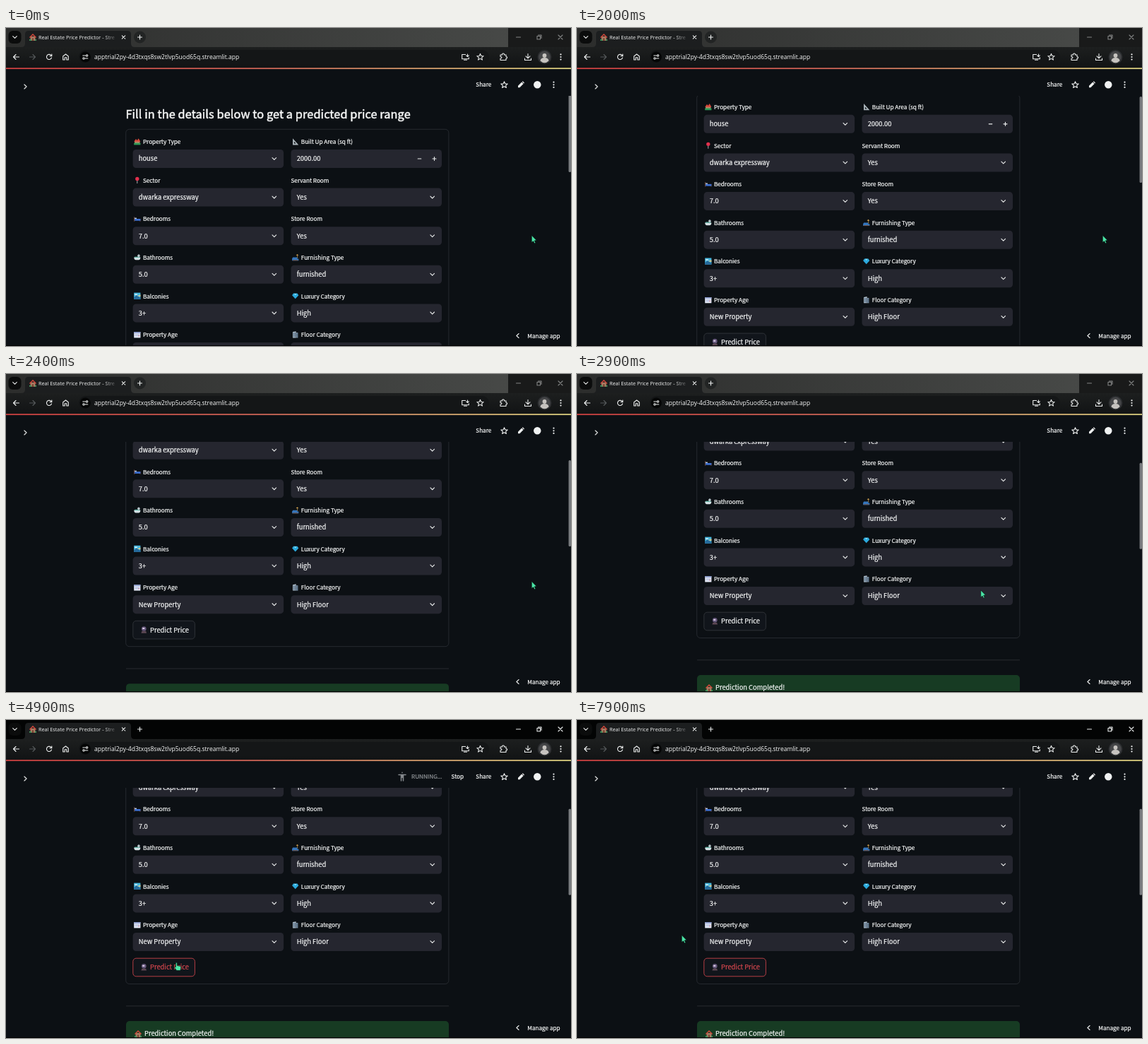
These frames come from a looping animation (800x450 px, 8000 ms). An HTML page:

```html
<!DOCTYPE html>
<html lang="en">
<head>
<meta charset="utf-8">
<title>Price predictor form</title>
<style>
  html, body { margin: 0; width: 100%; height: 100%; overflow: hidden; background: #0c1014; }
  svg { display: block; width: 800px; height: 450px; }
  text { font-family: "Noto Sans CJK SC", "Noto Sans CJK JP", "Noto Sans CJK", "Noto Sans", sans-serif; fill: #f7f8f8; stroke: #f7f8f8; stroke-width: .22px; white-space: pre; }
  .ui { font-family: "Open Sans", "Noto Sans", sans-serif; stroke: none; }
  .label { font-size: 8.16px; }
  .value { font-size: 9.33px; }
  .heading { font-size: 16.3px; stroke-width: .5px; letter-spacing: .09px; }
  .line { fill: none; stroke: #eceeee; stroke-width: 1.1; stroke-linecap: round; stroke-linejoin: round; }
  .dim { stroke: #55585a; }
</style>
</head>
<body>
<svg id="stage" viewBox="0 0 800 450"></svg>
<script>
const text = (x, y, s, cls, extra = '') => `<text x="${x}" y="${y}" class="${cls}" ${extra}>${s}</text>`;
const rect = (x, y, w, h, fill, r = 0, extra = '') =>
  `<rect x="${x}" y="${y}" width="${w}" height="${h}" rx="${r}" fill="${fill}" ${extra}/>`;
const circle = (x, y, r, fill) => `<circle cx="${x}" cy="${y}" r="${r}" fill="${fill}"/>`;
const line = (x, y, d, cls = '') => `<path class="line ${cls}" transform="translate(${x} ${y})" d="${d}"/>`;
const dots = (x, y) => [-3.6, 0, 3.6].map(d => circle(x, y + d, 1.1, '#eceeee')).join('');
const chevron = (x, y) => line(x, y, 'M-2.8 -1.4L0 1.4L2.8 -1.4');

// Small pictograms in a 10 by 10 box: colour and path pairs.
const icons = {
  home: ['#a87a62', 'M1.5 4h7v6h-7z', '#d9483b', 'M0 5L5 0L10 5L9 6L5 2L1 6z', '#3f8f5a', 'M0 8h3v2H0zM8 8h2v2H8z', '#74432f', 'M4 6.5h2V10H4z'],
  houses: ['#b98d6c', 'M1 4h8v5H1z', '#d9483b', 'M0 5L3 1L5 3L7 0L10 5z', '#2f9a57', 'M0 7h10v3H0z'],
  ruler: ['#aab4ba', 'M1 0L10 10H1zM3 5V8H6z'],
  pin: ['#b7bcc0', 'M4.5 5h1v5h-1z', '#e2304d', 'M5 0a2.9 2.9 0 1 1 0 5.8a2.9 2.9 0 1 1 0 -5.8'],
  bed: ['#7a5148', 'M0 2h1v7H0zM9 5h1v4H9z', '#3d6fd0', 'M1 5h9v3H1z', '#c9d7e6', 'M1 3.5h3V5H1z'],
  bath: ['#d5e1e5', 'M0 5h10q0 4 -3 4H3Q0 9 0 5z', '#66b9aa', 'M1 4h8v1.5H1z', '#b9c5cb', 'M6 1a2 2 0 1 1 0 3a2 2 0 0 1 0 -3'],
  view: ['#48b9e0', 'M0 0h10v10H0z', '#eaf4f8', 'M1 2h4v1.5H1z', '#25699a', 'M0 7L4 4L10 8V10H0z', '#e3c883', 'M5 5L10 3V6z'],
  calendar: ['#e4e9f5', 'M0 1h10v9H0z', '#8f9fd0', 'M0 1h10v2H0z', '#a9b8dc', 'M1.5 4.5h7v1h-7zM1.5 6.5h7v1h-7z', '#d9717c', 'M6.5 6.5h2v1h-2z'],
  sofa: ['#3576bd', 'M1 5h7v2h2v3H0V6h1z', '#dcaa55', 'M6 2L8 0L10 2zM8 2h.7v4H8z', '#7a4e35', 'M1 9h8v1H1z'],
  gem: ['#2ba9dc', 'M2 1h6l2 3l-5 5.5L0 4z', '#8ee0f5', 'M3 1.5h4L5 4z'],
  building: ['#aebdca', 'M1 1L6 0V10H1z', '#7d91a4', 'M6 2h3v8H6z', '#405c75', 'M2 2h1v7H2zM4 2h1v7H4zM7 3h1v6H7z'],
  orb: ['#66587c', 'M5 0a3.5 3.5 0 1 1 0 7a3.5 3.5 0 1 1 0 -7', '#e2d6ec', 'M3 2h3v2H3z', '#5d4855', 'M2 7h6l1 3H1z']
};
const icon = (name, x, y, s = 1) => {
  const p = icons[name];
  let out = `<g transform="translate(${x} ${y}) scale(${s})">`;
  for (let i = 0; i < p.length; i += 2) out += `<path fill="${p[i]}" fill-rule="evenodd" d="${p[i + 1]}"/>`;
  return out + '</g>';
};

// Each row: icon, label, value for the left field, then the right field.
const rows = [
  ['houses', 'Property Type', 'house', 'ruler', 'Built Up Area (sq ft)', '2000.00'],
  ['pin', 'Sector', 'dwarka expressway', '', 'Servant Room', 'Yes'],
  ['bed', 'Bedrooms', '7.0', '', 'Store Room', 'Yes'],
  ['bath', 'Bathrooms', '5.0', 'sofa', 'Furnishing Type', 'furnished'],
  ['view', 'Balconies', '3+', 'gem', 'Luxury Category', 'High'],
  ['calendar', 'Property Age', 'New Property', 'building', 'Floor Category', 'High Floor']
];
const field = (x, y, [pic, label, value], numeric) =>
  (pic ? icon(pic, x + 1.6, y + 13.2, .92) : '') +
  text(x + (pic ? 14.3 : 0), y + 21.2, label, 'label') +
  rect(x, y + 29, 213.5, 26, '#25262f', 4.5) +
  text(x + 8.2, y + 45.4, value, 'value') +
  (numeric
    ? line(x + 182, y + 42, 'M-2.3 0H2.3') + line(x + 203, y + 42, 'M-2.5 0H2.5M0 -2.5V2.5')
    : chevron(x + 200.2, y + 42));

const form =
  text(169.4, 128.2, 'Fill in the details below to get a predicted price range', 'heading') +
  rect(169.7, 143.3, 457.2, 374.2, 'none', 5, 'stroke="#2d3036" stroke-width=".8"') +
  rows.map((r, i) => {
    const y = 143 + 54.6 * i;
    return field(179.6, y, r.slice(0, 3)) + field(403.5, y, r.slice(3), i === 0);
  }).join('') +
  rect(179.8, 481.2, 87.6, 25.6, '#11151b', 4.5, 'id="button" stroke-width=".9"') +
  icon('orb', 190.5, 489, .95) +
  text(204, 497.4, 'Predict Price', 'value', 'id="predict"') +
  rect(170, 548.4, 457, .8, '#2d3036') +
  rect(170, 570, 457, 36, '#173b23', 5) +
  icon('home', 182, 583, 1) +
  text(196, 591.4, 'Prediction Completed!', 'value');

const star = 'M0 -4.6L1.3 -1.5L4.7 -1.3L2.1 .9L2.9 4.1L0 2.4L-2.9 4.1L-2.1 .9L-4.7 -1.3L-1.3 -1.5z';

const chrome =
  rect(0, 0, 800, 58, '#030404') +
  rect(0, 0, 800, 27, 'url(#strip)', 0, 'class="inactive"') +
  rect(3.5, 4, 18, 18, '#0b0c0c', 6) + chevron(12.5, 13) +
  `<path fill="#1c1e1f" d="M22 27Q27 27 27 22V9Q27 4 32 4H172Q177 4 177 9V22Q177 27 182 27z"/>` +
  rect(0, 27, 800, 30, 'url(#toolbar)') +
  icon('home', 33, 8, 1) +
  text(46, 15.8, 'Real Estate Price Predictor - Stre', 'ui', 'font-size="7.25" style="fill:url(#fade)"') +
  line(166.5, 13, 'M-2.2 -2.2L2.2 2.2M2.2 -2.2L-2.2 2.2') +
  `<circle class="inactive" cx="189.5" cy="13" r="8.5" fill="#222424"/>` +
  line(189.5, 13, 'M-3 0H3M0 -3V3') +
  rect(711, 0, 89, 27, '#191a1a', 0, 'class="inactive"') +
  `<g id="controls">` +
  line(725.5, 13, 'M-3 0H3') + line(755, 13, 'M-3 -1.5H1.5V3H-3zM-1.5 -3H3V1.5') +
  line(785, 13, 'M-3 -3L3 3M3 -3L-3 3') + '</g>' +
  line(14.5, 41, 'M4 0H-4L-.5 -3.5M-4 0L-.5 3.5') +
  line(37.5, 41, 'M-4 0H4L.5 -3.5M4 0L.5 3.5', 'dim') +
  line(61, 41, 'M3.5 1A3.6 3.6 0 1 1 2.6 -2.6L3.7 -1.4M3.8 -4V-1.3H1') +
  line(84.5, 41, 'M-3.8 4V-1L0 -4L3.8 -1V4H1.3V.8H-1.3V4z') +
  rect(103, 31, 581, 20.5, '#141617', 10) +
  circle(112.3, 41, 7.6, '#050606') +
  line(112.3, 41, 'M-3.5 -2H0M3.5 -2a1.2 1.2 0 1 1 -2.4 0a1.2 1.2 0 1 1 2.4 0M3.5 2H0M-3.5 2a1.2 1.2 0 1 1 2.4 0a1.2 1.2 0 1 1 -2.4 0') +
  text(125, 44, 'apptrial2py-4d3txqs8sw2tlvp5uod65q.streamlit.app', 'ui', 'font-size="8.56"') +
  line(650.5, 41, 'M0 -3.5H-4.8V2.7H4.8V.8M-2 4.2H2M3 -4V-.6M1.2 -2.2L3 -.4L4.8 -2.2') +
  line(671.5, 41, star) +
  line(704, 41, 'M-4 -3H-1.4Q-1.8 -5 0 -5T1.4 -3H4V-.5Q5.6 -.5 5.6 .8T4 2.1V4.5H-4V2Q-2 2 -2 .8T-4 -.5z') +
  line(739, 41, 'M0 -4.5V1.5M-3 -1.2L0 1.8L3 -1.2M-4.5 2V4.5H4.5V2') +
  circle(762.5, 41, 10, '#2c2e30') + circle(762.5, 41, 8.2, '#454648') +
  `<path fill="#c6c3bf" d="M756.5 46.5Q757 42 762.5 42T768.5 46.5Q762.5 52 756.5 46.5z"/>` + circle(762.5, 39, 2.9, '#c6c3bf') +
  dots(785.5, 41);

const header =
  rect(0, 56.4, 800, 1.7, 'url(#stripe)') +
  line(27.5, 83, 'M-1.6 -3L1.6 0L-1.6 3') +
  text(665.3, 83.2, 'Share', 'label') +
  line(705.5, 80.4, star) +
  `<path fill="#eceeee" d="M725 84.3V81.8L730.2 76.6L732.6 79L727.4 84.3zM730.8 76L731.8 75.2L734 77.4L733.2 78.4z"/>` +
  circle(752.3, 80.3, 5.2, '#f0f2f2') + dots(775.5, 80.3) +
  `<g id="running"><path id="pose" fill="none" stroke="#85898d" stroke-width="1.5" stroke-linecap="round" stroke-linejoin="round" transform="translate(561 80)"/>` +
  text(574, 83.2, 'RUNNING...', 'label', 'style="fill:#8e9296;stroke:#8e9296"') +
  text(630.5, 83.2, 'Stop', 'label') + '</g>' +
  line(724.5, 435.5, 'M1.6 -3L-1.6 0L1.6 3') +
  text(738.3, 438.7, 'Manage app', 'label');

const cursor =
  `<g id="cursor" stroke="#04110c" stroke-width=".6" fill="#4ce6a8">
    <path id="arrow" d="M0 0V10L2.3 8.1L3.9 11.3L5.5 10.5L3.9 7.4L6.8 7z"/>
    <path id="hand" d="M-1 .3Q0 -.8 1 .3V4L5 4.8Q6.6 5.2 6.4 7L5.6 11H.4L-2.7 7.2Q-3 5.6 -1 6.3z" transform="translate(1 0)"/>
  </g>`;

const $ = id => document.getElementById(id);
$('stage').innerHTML =
  `<defs>
    <clipPath id="body"><rect y="96" width="800" height="353"/></clipPath>
    <linearGradient id="strip"><stop stop-color="#2c2d2c"/><stop offset="1" stop-color="#4a4c4a"/></linearGradient>
    <linearGradient id="toolbar" x2="0" y2="1"><stop stop-color="#1d1f1f"/><stop offset="1" stop-color="#111314"/></linearGradient>
    <linearGradient id="stripe"><stop stop-color="#d94343"/><stop offset=".45" stop-color="#d9695a"/><stop offset="1" stop-color="#e8dd86"/></linearGradient>
    <linearGradient id="fade" gradientUnits="userSpaceOnUse" x1="138" x2="157"><stop stop-color="#f2f3f3"/><stop offset="1" stop-color="#f2f3f3" stop-opacity=".1"/></linearGradient>
  </defs>` +
  rect(0, 0, 800, 450, '#0c1014') +
  `<g clip-path="url(#body)"><g id="form">${form}</g>` +
  rect(796.6, 82, 3.4, 122, '#787b7e', 1.5, 'id="thumb"') + '</g>' +
  rect(0, 449, 800, 1, '#000') + chrome + header + cursor;

// Athlete poses shown while the app is running.
const poses = [
  'M-5 -2.5H5M0 -2.5V1.5M-1.5 -2V6M1.5 -2V6M0 -5.8V-5.6',
  'M-.5 -5.5V-5.3M-.5 -3L0 1H3L4.5 4.5M0 -1.5H3M-2 -1A3.6 3.6 0 1 0 2.5 4',
  'M2 -5.5V-5.3M1 -3L-1 1L2 3V6M-1 1L-3 4H-5M1 -3L-3 -2M1 -3L4 -.5',
  'M2 -5.5V-5.3M1 -3L-1 0L1 2V4M1 -2L4 -1M-1 4a2 2 0 1 1 -4 0a2 2 0 1 1 4 0M5 4a2 2 0 1 1 -4 0a2 2 0 1 1 4 0'
];

const LOOP = 8000, STEP = 100, FOCUS = 4400, RUN = [4700, 6900];
const span = (t, a, b) => Math.min(1, Math.max(0, (t - a) / (b - a)));
const smooth = u => u * u * (3 - 2 * u);
const setVisible = (el, on) => el.setAttribute('visibility', on ? 'visible' : 'hidden');
const inactive = document.querySelectorAll('.inactive');

function pointer(t) {
  const go = smooth(span(t, 2605, 3355)), leave = smooth(span(t, 5200, 5700));
  return [
    744.3 - 504 * go - 92 * leave,
    293.5 + 50 * go ** 1.3 - 39 * leave
  ];
}

function draw(t) {
  const scroll = 144 * (1 - (1 - span(t, 1850, 2600)) ** 1.87);
  $('form').setAttribute('transform', `translate(0 ${-scroll})`);
  $('thumb').setAttribute('y', 82 + scroll * .303);

  const [x, y] = pointer(t);
  const over = x > 180 && x < 267 && y > 337 && y < 363;
  $('cursor').setAttribute('transform', `translate(${x} ${y})`);
  setVisible($('hand'), over);
  setVisible($('arrow'), !over);

  const focused = t >= FOCUS, active = over || focused;
  $('button').setAttribute('stroke', active ? '#c8434a' : '#33363c');
  $('predict').style.fill = $('predict').style.stroke = active ? '#d5474e' : '#f7f8f8';

  inactive.forEach(el => setVisible(el, !focused));
  $('controls').setAttribute('opacity', focused ? 1 : .5);

  setVisible($('running'), t >= RUN[0] && t < RUN[1]);
  const pose = Math.floor(Math.max(0, t - RUN[0]) / 300) % poses.length;
  $('pose').setAttribute('d', poses[pose]);
}

const start = performance.now();
function tick() {
  const t = (performance.now() - start) % LOOP;
  draw(Math.floor(t / STEP) * STEP);
  requestAnimationFrame(tick);
}
tick();
</script>
</body>
</html>
```
